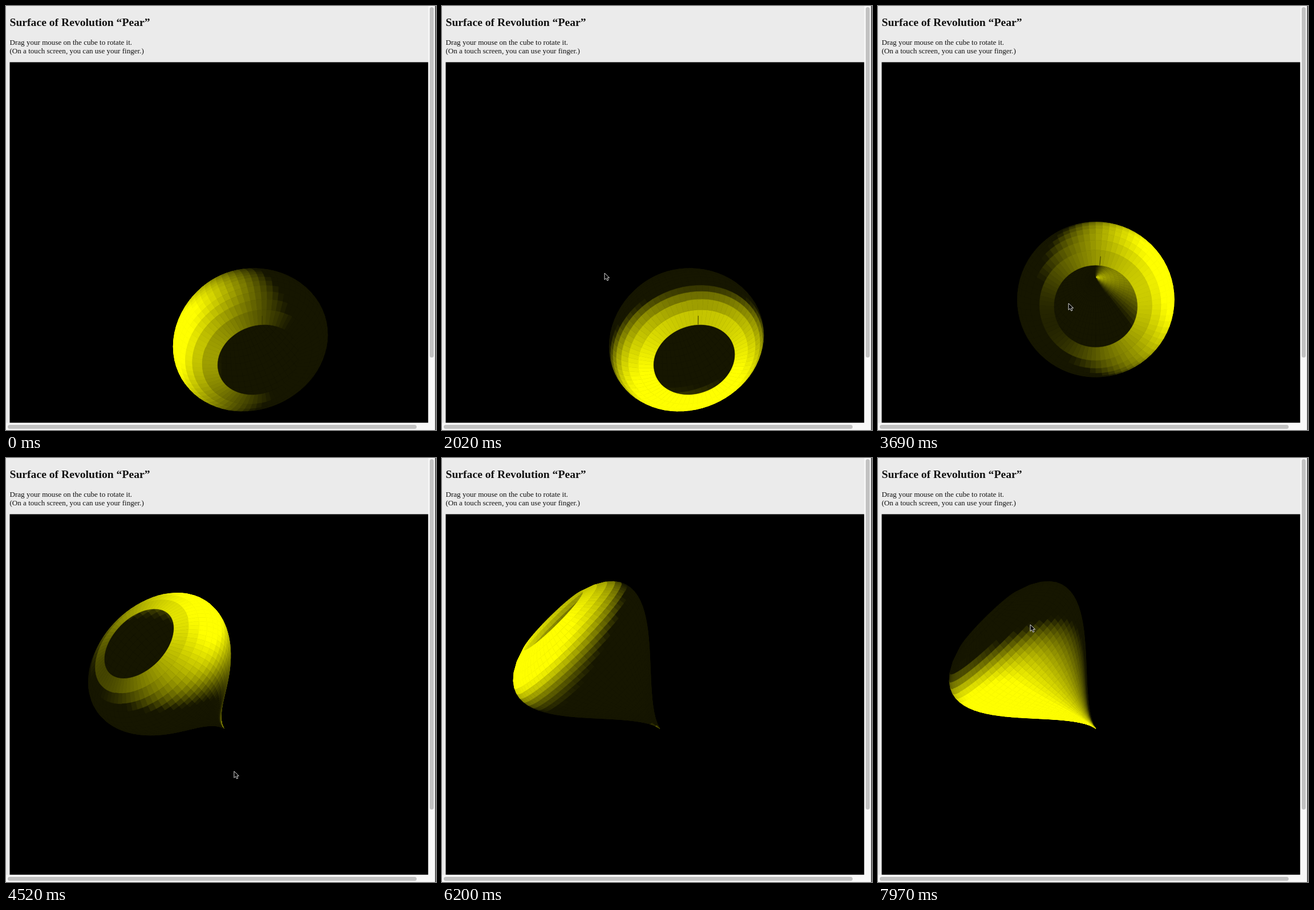
These frames come from a looping animation (754x743 px, 8 s). An HTML page with a canvas:

```html
<!DOCTYPE html>
<html lang="en">
<head>
<meta charset="utf-8">
<title>Surface of Revolution</title>
<style>
  html, body { margin: 0; width: 100%; height: 100%; overflow: hidden; background: #ebebeb; }
  canvas, svg { position: absolute; left: 0; top: 0; }
  text { font: 13.08px "Liberation Serif", "Times New Roman", serif; fill: #111; }
  .title { font-size: 19.65px; font-weight: bold; }
</style>
</head>
<body>
<canvas id="view" width="754" height="743"></canvas>
<svg width="754" height="743">
  <text class="title" x="6.5" y="34.5">Surface of Revolution “Pear”</text>
  <text x="6.5" y="67.5">Drag your mouse on the cube to rotate it.</text>
  <text x="6.5" y="82.5">(On a touch screen, you can use your finger.)</text>
  <path d="M740.5 0h13.500v743H0v-12.500h740.500z" fill="#f8f8f8"/>
  <rect x="743" y="2" width="7" height="614" rx="3.500" fill="#c2c2c2"/>
  <rect x="3" y="734" width="717" height="7" rx="3.500" fill="#c2c2c2"/>
  <rect x="752.500" width="1.500" height="743" fill="#333"/>
  <path id="cursor" d="M0 0V11.500L2.700 9L4.700 13.200L6.800 12.200L4.900 8.200H8.500Z"
        fill="#000" stroke="#ddd" stroke-width="1"/>
</svg>
<script>
const LOOP = 8000, RINGS = 30, SECTORS = 72;
const LENGTH = 277, WIDTH = 181.2, CENTER = { x: 382, y: 474 };
const AMBIENT = 0.085, DIFFUSE = 1.05, LIGHT_Z = 0.5;
const RAD = Math.PI / 180;

// Rows hold a time in ms followed by values.
const POSE = [[0, -77, 34], [2500, -77, 34], [3690, -90, 11.3], [4520, -123.7, -41.8], [5300, -134.3, -80]];
const LIGHT = [[0, 183], [820, 232], [1670, 260], [2020, 279], [LOOP, 625]];
const POINTER = [[1650, 255, 440], [2020, 285, 468], [2500, 296, 490], [3690, 334, 521],
                 [4520, 400, 549], [5400, 305, 467], [5800, 255, 420]];
const POINTER_BACK = [[7500, 215, 225], [7970, 267, 292]];

const ctx = document.getElementById("view").getContext("2d");
const cursor = document.getElementById("cursor");

function track(rows, time) {
  const next = rows.findIndex(row => row[0] > time);
  if (next < 0) return rows[rows.length - 1].slice(1);
  if (next === 0) return rows[0].slice(1);
  const a = rows[next - 1], b = rows[next];
  const k = (time - a[0]) / (b[0] - a[0]);
  return a.slice(1).map((v, i) => v + (b[i + 1] - v) * k);
}

// Pear curve: WIDTH² r² = x³ (LENGTH - x)
const radius = x => Math.sqrt(x ** 3 * (LENGTH - x)) / WIDTH;
const ringX = i => LENGTH * i / RINGS;
const onRing = (x, r, angle) => [x, r * Math.cos(angle), r * Math.sin(angle)];

const facets = [];
for (let i = 0; i < RINGS - 1; i++) {
  const x0 = ringX(i), x1 = ringX(i + 1), r0 = radius(x0), r1 = radius(x1);
  const slope = (r1 - r0) / (x1 - x0), norm = Math.hypot(1, slope);
  for (let j = 0; j < SECTORS; j++) {
    const a = 2 * Math.PI * j / SECTORS, b = 2 * Math.PI * (j + 1) / SECTORS, mid = (a + b) / 2;
    facets.push({
      corners: [onRing(x0, r0, a), onRing(x1, r1, a), onRing(x1, r1, b), onRing(x0, r0, b)],
      center: onRing((x0 + x1) / 2, (r0 + r1) / 2, mid),
      normal: onRing(-slope / norm, 1 / norm, mid)
    });
  }
}

function rotator(yaw, pitch) {
  const cy = Math.cos(yaw), sy = Math.sin(yaw), cp = Math.cos(pitch), sp = Math.sin(pitch);
  return ([x, y, z]) => {
    const depth = z * cy - x * sy;
    return [x * cy + z * sy, y * cp - depth * sp, y * sp + depth * cp];
  };
}

function tracePath(points) {
  ctx.beginPath();
  for (const [x, y] of points) ctx.lineTo(CENTER.x + x, CENTER.y - y);
}

function drawSeam(rotate) {
  const angle = -5.5 * RAD, x = ringX(RINGS - 1), r = radius(x);
  if (rotate(onRing(0.94, 0.35, angle))[2] < 0.5) return;
  tracePath([onRing(x, r, angle), onRing(x - 5.5, r + 15, angle)].map(rotate));
  ctx.strokeStyle = "#3a3a00";
  ctx.lineWidth = 1;
  ctx.stroke();
}

function drawPear(time) {
  const [yaw, pitch] = track(POSE, time).map(v => v * RAD);
  const lightAngle = track(LIGHT, time)[0] * RAD, lightNorm = Math.hypot(1, LIGHT_Z);
  const light = [Math.cos(lightAngle), Math.sin(lightAngle), LIGHT_Z].map(v => v / lightNorm);
  const rotate = rotator(yaw, pitch);

  for (const facet of facets) facet.depth = rotate(facet.center)[2];
  facets.sort((a, b) => a.depth - b.depth);
  ctx.lineWidth = 0.6;
  for (const { corners, normal } of facets) {
    const n = rotate(normal);
    const lit = Math.max(0, n[0] * light[0] + n[1] * light[1] + n[2] * light[2]);
    const level = Math.round(255 * Math.min(1, AMBIENT + DIFFUSE * lit));
    tracePath(corners.map(rotate));
    ctx.closePath();
    ctx.fillStyle = ctx.strokeStyle = `rgb(${level},${level},0)`;
    ctx.fill();
    ctx.stroke();
  }
  drawSeam(rotate);
}

function placeCursor(time) {
  const rows = [POINTER, POINTER_BACK].find((r, i) =>
    time >= r[0][0] && (i === 1 || time <= r[r.length - 1][0]));
  cursor.style.display = rows ? "" : "none";
  if (rows) cursor.setAttribute("transform", `translate(${track(rows, time).join(" ")})`);
}

function frame() {
  const time = performance.now() % LOOP;
  ctx.fillStyle = "#ebebeb";
  ctx.fillRect(0, 0, 754, 743);
  ctx.fillStyle = "#000";
  ctx.fillRect(6.5, 98.5, 734, 632);
  drawPear(time);
  placeCursor(time);
  requestAnimationFrame(frame);
}
frame();
</script>
</body>
</html>
```
